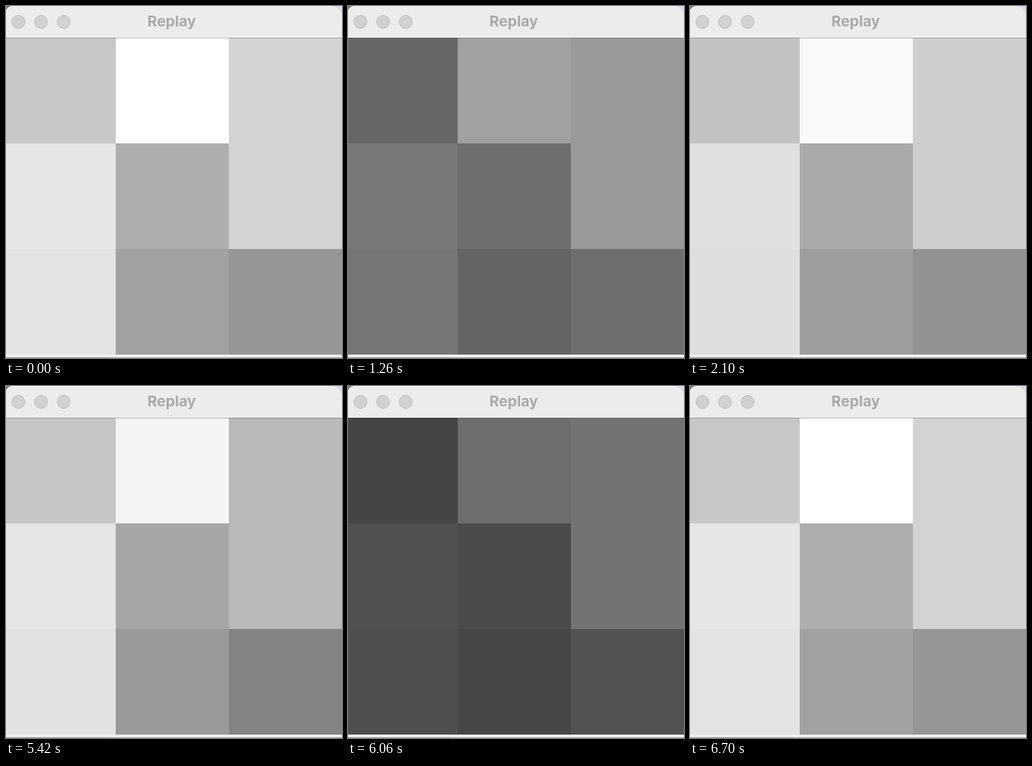
An HTML page for the animation above (7060 ms loop, 594 px wide and 620 px high).

```html
<!DOCTYPE html>
<html lang="en">
<head>
<meta charset="utf-8">
<title>Replay</title>
<style>
html, body { margin: 0; width: 100%; height: 100%; overflow: hidden; }
svg { display: block; }
text { font: 700 26px Inter, "Liberation Sans", sans-serif; }
</style>
</head>
<body>
<svg width="594" height="620" viewBox="0 0 594 620">
  <rect width="594" height="620" fill="#dcdce6"/>
  <rect width="20" height="20" fill="#777"/>
  <path d="M0 620V8Q3 0 12 0H574A20 20 0 0 1 594 20V620Z" fill="#ececec"/>
  <path d="M10 .5H576" stroke="#f8f8f8"/>
  <g id="tiles" shape-rendering="crispEdges"></g>
  <path d="M0 56.5H594" stroke="#000" stroke-opacity=".3"/>
  <g fill="#d1d1d1" stroke="#b8b8b8">
    <circle cx="22" cy="28" r="11.5"/>
    <circle cx="62" cy="28" r="11.5"/>
    <circle cx="102" cy="28" r="11.5"/>
  </g>
  <text x="293" y="36" text-anchor="middle" fill="#aaa">Replay</text>
  <path d="M0 616H594" stroke="#f1f1f1" stroke-width="4"/>
  <path d="M0 618.5H182" stroke="#dcdcdc"/>
  <path d="M0 619.5H594" stroke="#858585"/>
</svg>
<script>
const LOOP = 7060, STEP = 53, HALF = 560;
const xs = [0, 194, 394, 594], ys = [56, 242, 428, 614];

// Greys of the unshaded tiles, row by row
const greys = [199, 255, 211, 230, 174, 211, 227, 161, 150];

// A shadow crosses the columns, first rightwards, then back.
// lag and fade are the changes of time and depth from column to column.
const passes = [
  { start: 1040, mid: 1497, lag: 45, depth: .62, fade: .05 },
  { start: 5420, mid: 5890, lag: -64, depth: .71, fade: 0 }
];

const group = document.getElementById("tiles");
const tiles = greys.map((_, i) => {
  const c = i % 3, r = Math.floor(i / 3);
  const tile = document.createElementNS("http://www.w3.org/2000/svg", "rect");
  const box = { x: xs[c], y: ys[r], width: xs[c + 1] - xs[c], height: ys[r + 1] - ys[r] };
  for (const name in box) tile.setAttribute(name, box[name]);
  return group.appendChild(tile);
});

function shade(pass, column, t) {
  if (t < pass.start) return 0;
  const held = t - (t - pass.start) % STEP;
  const side = column - 1;
  const x = (held - pass.mid - side * pass.lag) / HALF;
  if (Math.abs(x) >= 1) return 0;
  return (pass.depth - side * pass.fade) * Math.cos(x * Math.PI / 2) ** 2;
}

function draw(t) {
  // The room stays slightly dimmer between the two passes
  const room = t > 2000 && t < passes[1].start ? .976 : 1;
  const light = [0, 1, 2].map(c => passes.reduce((l, pass) => l - shade(pass, c, t), room));
  tiles.forEach((tile, i) => {
    const v = Math.round(greys[i] * light[i % 3]);
    tile.setAttribute("fill", `rgb(${v},${v},${v})`);
  });
}

function loop() {
  draw(performance.now() % LOOP);
  requestAnimationFrame(loop);
}
loop();
</script>
</body>
</html>
```
